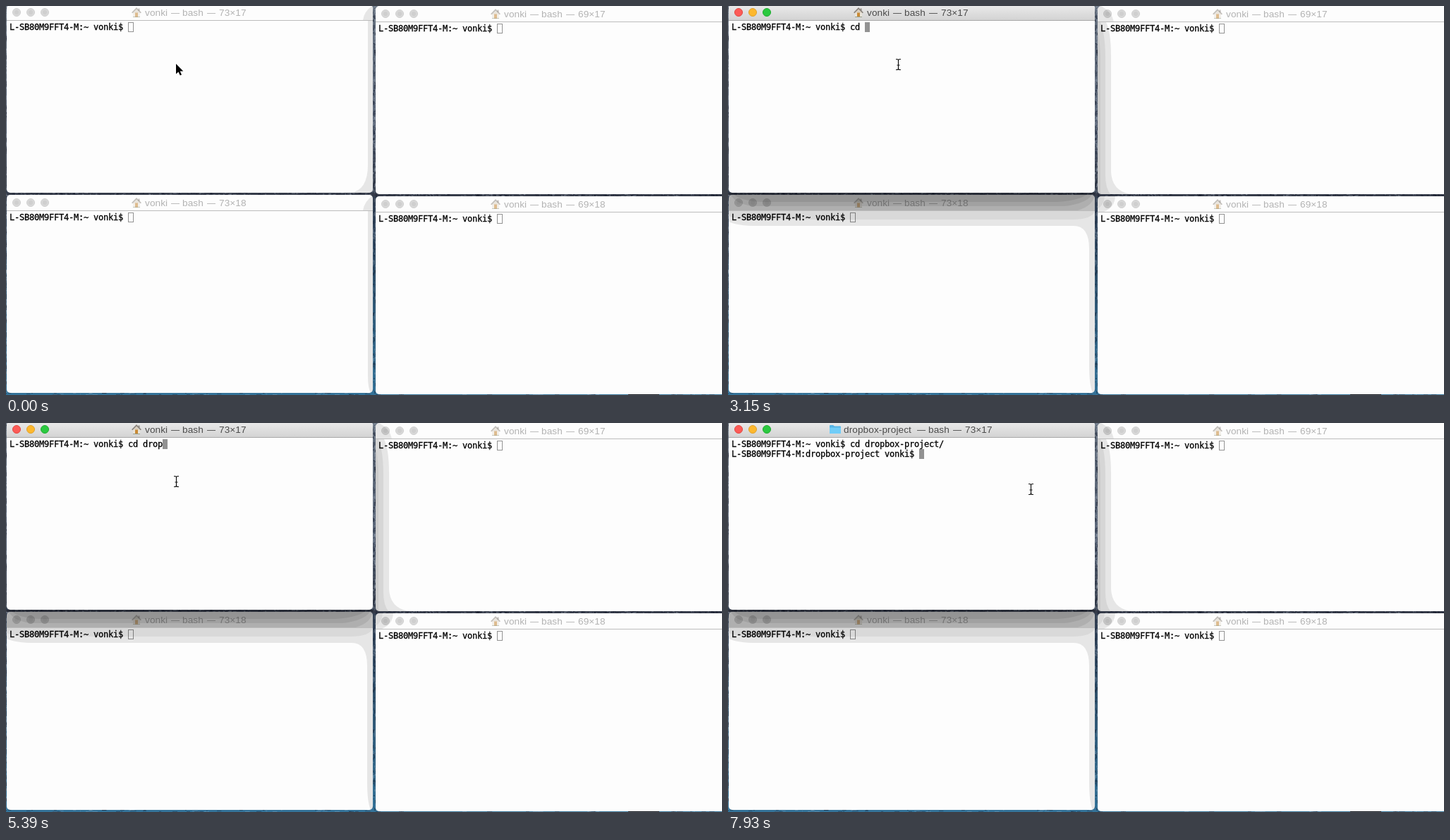
Write an HTML page with a canvas that moves like this. It is 1015 by 552 pixels and loops after 8 s.

```html
<!DOCTYPE html>
<html lang="en">
<head>
<meta charset="utf-8">
<title>Four terminals</title>
<style>
html, body { margin: 0; width: 100%; height: 100%; overflow: hidden; background: #fdfdfd; }
canvas { display: block; }
</style>
</head>
<body>
<canvas id="stage" width="1015" height="552"></canvas>
<script>
const LOOP = 8000;
const W = 1015, H = 552;
const CELL_W = 7, CELL_H = 14;
const USER = 'vonki';
const HOST = 'L-SB80M9FFT4-M:';
const FOLDER = 'dropbox-project';
const HOME_PROMPT = `${HOST}~ ${USER}$ `;
const COMMAND = `cd ${FOLDER}/`;
const MONO = '12px "DejaVu Sans Mono", "Liberation Mono", monospace';
const SANS = '13.6px "Liberation Sans", Arial, sans-serif';

// time, number of typed characters
const TYPING = [[0, 0], [2850, 1], [3000, 2], [3150, 3], [4640, 4], [5090, 6], [5390, 7], [5690, COMMAND.length]];
const FOCUS = 150, ENTER = 6430, MOVE = 7930;

const canvas = document.getElementById('stage');
const g = canvas.getContext('2d');

// bar: y of the line below the title bar; end: right edge of the title
const windows = {
  topLeft: { x: 1, y: -2, w: 519, h: 267, bar: 20, end: 340, size: '73×17' },
  topRight: { x: 524, y: 0, w: 495, h: 267, bar: 22, end: 849, size: '69×17' },
  lowLeft: { x: 1, y: 268, w: 519, h: 281, bar: 290, end: 340, size: '73×18' },
  lowRight: { x: 524, y: 270, w: 495, h: 281, bar: 292, end: 849, size: '69×18' }
};

function rect(x, y, w, h, color) {
  g.fillStyle = color;
  g.fillRect(x, y, w, h);
}

function shape(path, color) {
  g.fillStyle = color;
  g.fill(new Path2D(path));
}

function outline(win) {
  g.beginPath();
  g.roundRect(win.x, win.y, win.w, win.h, 5);
}

function vertical(y0, y1, stops) {
  const fill = g.createLinearGradient(0, y0, 0, y1);
  stops.forEach(([at, color]) => fill.addColorStop(at, color));
  return fill;
}

function drawWallpaper() {
  rect(0, 0, W, H, vertical(0, H, [
    [0, '#66717f'], [0.3, '#586477'], [0.46, '#39414f'],
    [0.54, '#2e3f55'], [0.72, '#2f536f'], [1, '#347399']
  ]));
  let seed = 7;
  const random = () => (seed = (seed * 16807) % 2147483647) / 2147483647;
  const speckle = (x, y, w, h, count, maxW, maxH) => {
    for (let i = 0; i < count; i++) {
      const color = random() < 0.5 ? 'rgba(15,22,38,.35)' : 'rgba(190,200,215,.22)';
      rect(x + Math.floor(random() * w), y + Math.floor(random() * h),
        1 + random() * maxW, 1 + random() * maxH, color);
    }
  };
  rect(0, 265, W, 5, '#353b49');
  speckle(519, 0, 6, 268, 240, 1, 5);
  speckle(519, 270, 6, 280, 110, 1, 5);
  speckle(0, 0, 1, H, 120, 0, 6);
  speckle(0, 264, W, 6, 560, 4, 1);
  speckle(0, 549, W, 3, 110, 8, 0);
  rect(882, 551, 44, 1, '#0c1118');
}

function drawHouse(x, y, active) {
  g.save();
  g.translate(x, y);
  g.globalAlpha = active ? 1 : 0.5;
  shape('M2 7H12V14H2Z', '#e9e4da');
  shape('M9.5 1.5H11.5V5H9.5Z', '#8f8a84');
  shape('M7 0L14 7.2L12.6 8.3L7 2.8L1.4 8.3L0 7.2Z', '#8b857f');
  shape('M7 2.8L11.8 7.5H2.2Z', '#d8cdbd');
  shape('M5 7.5H9V14H5Z', '#c98a35');
  shape('M2 13H12V14H2Z', '#98a08c');
  g.restore();
}

function drawFolder(x, y) {
  g.save();
  g.translate(x, y);
  shape('M0 2Q0 1 1 1H5L7 2.5H15Q16 2.5 16 3.5V12Q16 13 15 13H1Q0 13 0 12Z', '#57b5e6');
  shape('M0 4.5H16V12Q16 13 15 13H1Q0 13 0 12Z', '#71cdf8');
  g.restore();
}

function drawTitle(win, end, name, active, folder) {
  const base = win.bar - 6;
  const parts = [[name, folder ? -210 : -143], ['bash', -90], [win.size, -38]];
  const color = active ? '#4b4b4b' : '#b3b3b3';
  g.font = SANS;
  g.letterSpacing = '0.1px';
  g.fillStyle = color;
  parts.forEach(([text, dx]) => g.fillText(text, end + dx, base));
  g.letterSpacing = '0px';
  g.font = SANS.replace('13.6', '12');
  [-106, -55].forEach(dx => g.fillText('—', end + dx, base));
  if (folder) drawFolder(end - 230, win.bar - 18);
  else drawHouse(end - 162, win.bar - 18, active);
}

function drawLights(win, active) {
  const colors = ['#fc5b57', '#fdb82e', '#2bc940'];
  const rims = ['#e2463f', '#e0a02a', '#1fab30'];
  for (let i = 0; i < 3; i++) {
    g.beginPath();
    g.arc(win.x + 14 + i * 20, win.bar - 11, 5.5, 0, 7);
    g.fillStyle = active ? colors[i] : '#d8d8d8';
    g.strokeStyle = active ? rims[i] : '#d0d0d0';
    g.lineWidth = 1;
    g.fill();
    g.stroke();
    if (!active) {
      g.beginPath();
      g.arc(win.x + 14 + i * 20, win.bar - 11, 3, 0, 7);
      g.fillStyle = '#cfcfcf';
      g.fill();
    }
  }
}

function drawLine(win, row, text) {
  const x = win.x + 4, base = win.bar + 14 + row * CELL_H;
  g.font = MONO;
  g.fillStyle = g.strokeStyle = '#000';
  g.lineWidth = 0.3;
  [...text].forEach((char, i) => {
    g.fillText(char, x + i * CELL_W, base);
    g.strokeText(char, x + i * CELL_W, base);
  });
}

function drawCaret(win, row, col, active) {
  const x = win.x + 4 + col * CELL_W, y = win.bar + 3 + row * CELL_H;
  if (active) {
    rect(x, y, CELL_W, CELL_H, '#929292');
  } else {
    g.strokeStyle = '#929292';
    g.lineWidth = 1;
    g.strokeRect(x + 0.5, y + 0.5, CELL_W, CELL_H - 1);
  }
}

function drawWindow(win, { active = false, lines = [HOME_PROMPT], folder = false }) {
  g.save();
  outline(win);
  g.clip();
  rect(win.x, win.y, win.w, win.h, '#fdfdfd');
  if (active) {
    rect(win.x, win.y, win.w, win.bar - win.y,
      vertical(win.y, win.bar, [[0, '#ebebeb'], [1, '#d3d3d3']]));
  }
  rect(win.x, win.bar, win.w, 1, active ? '#a9a9a9' : '#bcbcbc');
  drawLights(win, active);
  drawTitle(win, folder ? 374 : win.end, folder ? FOLDER : USER, active, folder);
  lines.forEach((line, row) => drawLine(win, row, line));
  const last = lines.length - 1;
  drawCaret(win, last, lines[last].length, active);
  g.restore();
}

function shade(win, layers) {
  g.save();
  outline(win);
  g.clip();
  layers.forEach(([path, alpha]) => shape(path, `rgba(0,0,0,${alpha})`));
  g.restore();
}

function shadeUnfocused() {
  shade(windows.topLeft, [
    ['M519 0Q508 7 506 20H520V0Z M513 21V225Q513 262 488 265H520V21Z', 0.09]
  ]);
  shade(windows.lowLeft, [
    ['M520 269Q508 277 506 290H520Z M513 291V525Q513 542 517 549H520V291Z', 0.09]
  ]);
}

function shadeFocused() {
  rect(0, 265, 520, 3, 'rgba(0,0,0,.25)');
  shade(windows.topRight, [
    ['M524 0H529Q544 8 547 22H524Z', 0.09],
    ['M524 23H536Q543 38 543 70V235Q544 262 570 267H524Z', 0.09],
    ['M524 23H528Q535 40 535 75V240Q535 258 542 267H524Z', 0.07],
    ['M524 35Q528 50 528 80V267H524Z', 0.05]
  ]);
  shade(windows.lowRight, [
    ['M524 270H549Q548 286 533 292H524Z', 0.09],
    ['M524 270H534Q533 282 524 288Z', 0.06]
  ]);
  shade(windows.lowLeft, [
    ['M1 268H520V290H1Z', 0.25],
    ['M1 268H520Q517 284 496 290H1Z', 0.08],
    ['M4 268H516Q508 280 478 284H34Q10 280 4 268Z', 0.08],
    ['M9 268H508Q496 276 468 278H46Q18 276 9 268Z', 0.08],
    ['M1 291H520V549H517Q512 538 512 510V345Q512 312 490 312H40Q14 312 1 306Z', 0.09],
    ['M1 291H520Q516 303 488 303H30Q12 303 1 298Z', 0.06]
  ]);
}

function drawArrow(x, y) {
  g.save();
  g.translate(x, y);
  const path = new Path2D('M0 0V14.5L3.4 11.4L5.8 16.6L8 15.6L5.7 10.6H10.3Z');
  g.strokeStyle = '#fff';
  g.lineWidth = 2;
  g.stroke(path);
  g.fillStyle = '#000';
  g.fill(path);
  g.restore();
}

function drawBeam(x, y) {
  g.save();
  g.translate(x + 0.5, y);
  g.strokeStyle = '#111';
  g.lineWidth = 1.2;
  g.stroke(new Path2D('M-3.5 -7.5H-2Q0 -7.5 0 -5.5Q0 -7.5 2 -7.5H3.5M0 -6V6M-3.5 7.5H-2Q0 7.5 0 5.5Q0 7.5 2 7.5H3.5M-2 1H2'));
  g.restore();
}

function drawScene(t) {
  const active = t >= FOCUS, entered = t >= ENTER;
  const typed = TYPING.filter(([at]) => t >= at).pop()[1];
  const lines = [HOME_PROMPT + COMMAND.slice(0, typed)];
  if (entered) lines.push(`${HOST}${FOLDER} ${USER}$ `);

  drawWallpaper();
  drawWindow(windows.lowLeft, {});
  drawWindow(windows.lowRight, {});
  drawWindow(windows.topRight, {});
  if (active) shadeFocused();
  drawWindow(windows.topLeft, { active, lines, folder: entered });
  if (!active) shadeUnfocused();

  if (!active) drawArrow(241, 82);
  else if (t < MOVE) drawBeam(241, 83);
  else drawBeam(429, 94);
}

const CHANGES = [...TYPING.map(([at]) => at), FOCUS, ENTER, MOVE].sort((a, b) => a - b);
const start = performance.now();
let shown = -1;

function tick() {
  const t = (performance.now() - start) % LOOP;
  const step = CHANGES.filter(at => at <= t).length;
  if (step !== shown) {
    shown = step;
    drawScene(t);
  }
  requestAnimationFrame(tick);
}
tick();
</script>
</body>
</html>
```
